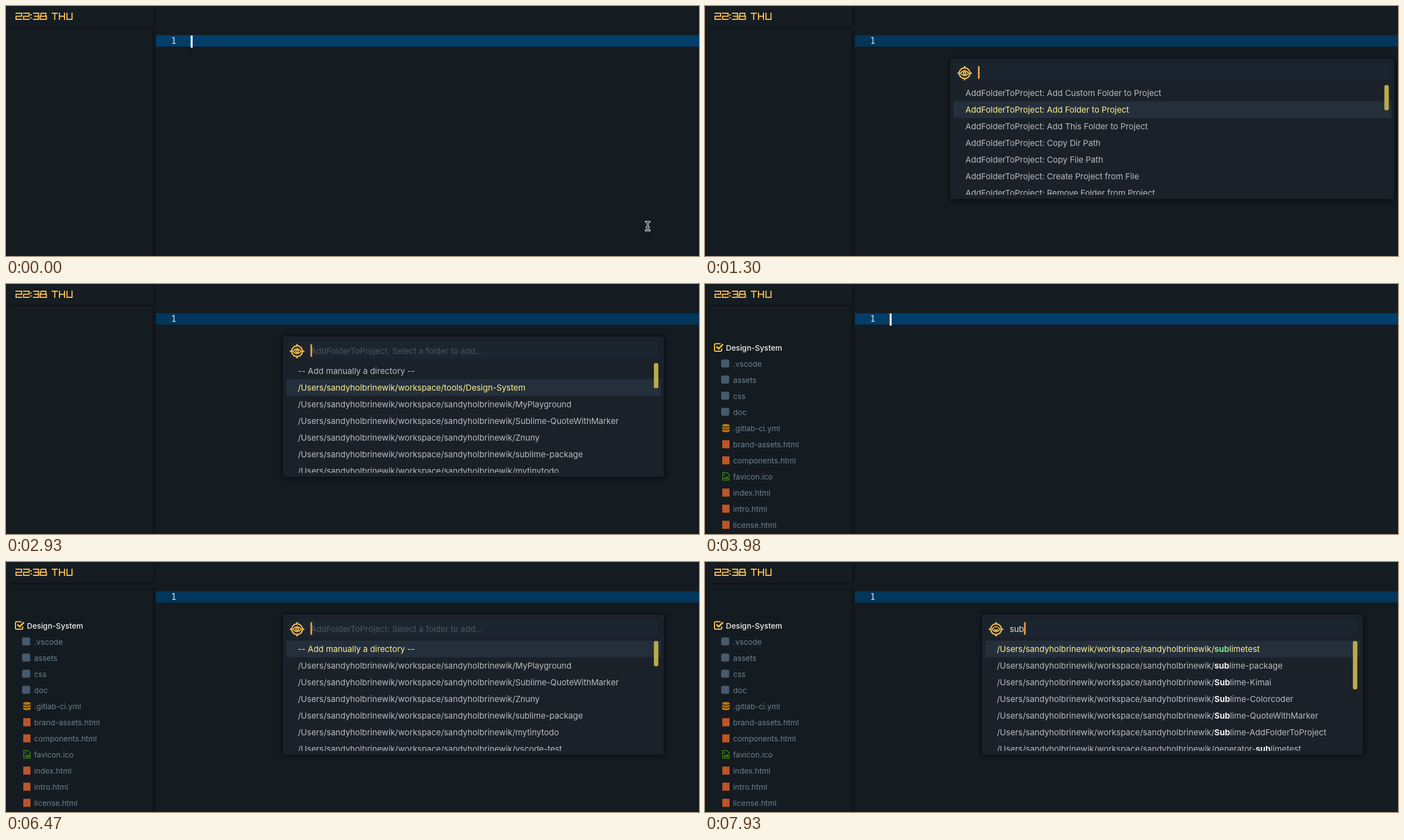
An HTML page that plays this animation: 1244 by 450 pixels, repeating every 8 s.

```html
<!DOCTYPE html>
<html lang="en">
<head>
<meta charset="utf-8">
<title>Add folder to project</title>
<style>
  html, body { margin: 0; width: 100%; height: 100%; overflow: hidden; background: #141b21; }
  svg { display: block; width: 100%; height: 100%; }
  text { font-family: Inter, Roboto, sans-serif; font-size: 14.8px; font-feature-settings: "calt" 0; white-space: pre; }
  .num { font-family: "DejaVu Sans Mono", monospace; font-size: 15px; fill: #dde4e6; }
  .side { font-size: 13.75px; fill: #6c818d; }
  .root { font-size: 13.75px; font-weight: 500; fill: #eff1ed; }
  .row { fill: #babdc0; }
  .row.on { fill: #fdf18f; }
  .hit { font-weight: 700; fill: #f0f2f3; }
  .on .hit { fill: #7de58a; }
  .hint { fill: #50545a; }
  .typed { fill: #eadfc0; }
  .line { fill: none; stroke-width: 2; }
</style>
</head>
<body>
<svg viewBox="0 0 1244 450" preserveAspectRatio="none">
  <defs>
    <filter id="soft" x="-10%" y="-10%" width="120%" height="120%"><feGaussianBlur stdDeviation="4"/></filter>
    <filter id="edge" filterUnits="userSpaceOnUse" x="-10" y="-10" width="300" height="480"><feGaussianBlur stdDeviation="1.2"/></filter>
    <clipPath id="list"><rect x="440" y="141" width="800" height="199"/></clipPath>
    <path id="beam" d="M1148.5 388.5Q1152 388.5 1152 391V401.5Q1152 404 1148.5 404M1155.5 388.5Q1152 388.5 1152 391M1152 401.5Q1152 404 1155.5 404M1150 398H1154"/>
  </defs>
  <rect width="1244" height="450" fill="#141b21"/>
  <path d="M8 37.5H265M265.5 0V37M265.5 46V450" fill="none" stroke="#0c1115" stroke-width="2.5" filter="url(#edge)"/>
  <rect width="264" height="36.5" fill="#151c22"/>
  <g id="clock" class="line" stroke="#fbc04c" role="img" aria-label="22:38 THU"></g>
  <g id="tree"></g>
  <rect id="current" x="269" y="52.5" width="975" height="20.5"/>
  <text class="num" x="296.5" y="67.5">1</text>
  <rect id="caret" x="331.5" y="53" width="3.5" height="22" fill="#f6f8f9"/>
  <g id="pointer" fill="none" stroke-linecap="round">
    <use href="#beam" stroke="#fff" stroke-width="3.3"/>
    <use href="#beam" stroke="#12181d" stroke-width="1.3"/>
  </g>
  <g id="panel"></g>
</svg>
<script>
const LOOP = 8000;
const $ = id => document.getElementById(id);
const home = '/Users/sandyholbrinewik/workspace/';
const own = home + 'sandyholbrinewik/';

const commands = ['Add Custom Folder to Project', 'Add Folder to Project', 'Add This Folder to Project',
  'Copy Dir Path', 'Copy File Path', 'Create Project from File', 'Remove Folder from Project']
  .map(name => 'AddFolderToProject: ' + name);
const manual = '-- Add manually a directory --';
const repos = ['MyPlayground', 'Sublime-QuoteWithMarker', 'Znuny', 'sublime-package', 'mytinytodo', 'vscode-test']
  .map(name => own + name);
const folders = [manual, home + 'tools/Design-System', ...repos.slice(0, 5)];
const remaining = [manual, ...repos];
const found = ['sublimetest', 'sublime-package', 'Sublime-Kimai', 'Sublime-Colorcoder',
  'Sublime-QuoteWithMarker', 'Sublime-AddFolderToProject', 'generator-sublimetest'].map(name => own + name);

const palette = { x: 441.5, w: 795, rows: commands };
const picker = { x: 498, w: 682, rows: folders, hint: 'AddFolderToProject: Select a folder to add...' };

// Each scene holds until the next one starts.
const scenes = [
  { at: 0 },
  { at: 330, ...palette, sel: 0, fade: [740, 815, 890] },
  { at: 1300, ...palette, sel: 1, fade: [1790, 1870, 1950] },
  { at: 2110, ...picker, sel: 0, fade: [2610, 2690] },
  { at: 2930, ...picker, sel: 1, fade: [3420, 3500] },
  { at: 3980 },
  { at: 5230, ...palette, sel: 1, fade: [5640, 5720] },
  { at: 6470, ...picker, rows: remaining, sel: 0, fade: [6880, 6960, 7040] },
  { at: 7450, ...picker, rows: found, sel: 0, typed: 's', thumb: 52 },
  { at: 7610, ...picker, rows: found, sel: 0, typed: 'su', thumb: 62 },
  { at: 7770, ...picker, rows: found, sel: 0, typed: 'sub', thumb: 87 }
];
const blinks = [[1790, 1950], [3660, 3740], [7930, LOOP]];

function rect(x, y, w, h, fill, extra = '') {
  return `<rect x="${x}" y="${y}" width="${w}" height="${h}" fill="${fill}" ${extra}/>`;
}

function label(x, y, cls, text) {
  return `<text x="${x}" y="${y}" class="${cls}">${text}</text>`;
}

function drawClock() {
  const glyphs = {
    2: 'M0 0H11V5.5H1V11H12',
    3: 'M0 0H10V11H0M2 5.5H10',
    8: 'M1 0H10V5.5H0V11H11V5.5H10M1 0V5.5',
    ':': 'M0 3H3M0 8.5H3',
    T: 'M0 0H11M5.5 0V12',
    H: 'M1 -1V12M1 5.5H10M10 -1V12',
    U: 'M1 -1V11H10V-1'
  };
  const places = [17, 30.5, 43.5, 48.5, 61.5, 82, 95, 108.5];
  $('clock').innerHTML = [...'22:38THU'].map((c, i) =>
    `<path transform="translate(${places[i]} 13)" d="${glyphs[c]}"/>`).join('');
}

function fileIcon(name, y) {
  if (!name.includes('.') || name === '.vscode') return rect(29, y - 8, 14.5, 14.5, '#465a6e', 'rx="3"');
  if (name.endsWith('.html')) return rect(31, y - 7.5, 13, 14.5, '#bd5528');
  if (name.endsWith('.ico')) {
    return `<g transform="translate(31 ${y - 8})" fill="none" stroke="#3b880e" stroke-width="1.5">
      <path d="M.8 .8H8.5L12.3 4.5V14.2H.8Z"/><path d="M2.5 12L5 8.5L6.5 10L9 6.8L11 12Z" fill="#3b880e" stroke="none"/>
      <circle cx="4" cy="5" r="1.2" fill="#3b880e" stroke="none"/></g>`;
  }
  return `<g transform="translate(30.8 ${y - 7.8})">
    <path d="M0 2.5C0 -.8 13.5 -.8 13.5 2.5V12.5C13.5 15.8 0 15.8 0 12.5Z" fill="#ba760b"/>
    <path d="M0 4.2Q6.75 7.6 13.5 4.2M0 8.7Q6.75 12.1 13.5 8.7" fill="none" stroke="#141b21" stroke-width="1.3"/></g>`;
}

function drawTree() {
  const files = ['.vscode', 'assets', 'css', 'doc', '.gitlab-ci.yml', 'brand-assets.html', 'components.html',
    'favicon.ico', 'index.html', 'intro.html', 'license.html'];
  $('tree').innerHTML =
    `<g class="line" stroke="#fbc04c"><path d="M28 107.5H19Q17 107.5 17 109.5V119Q17 121 19 121H28Q30 121 30 119V116"/>
     <path d="M20.5 112.5L24.5 116.5L32.3 108.5" stroke-width="2.8"/></g>` +
    label(37.5, 119.5, 'root', 'Design-System') +
    files.map((name, i) => {
      const y = 143.7 + i * 29;
      return fileIcon(name, y) + label(50.5, y + 5, 'side', name);
    }).join('');
}

function eyeIcon(x) {
  return `<g transform="translate(${x} 121)" class="line" stroke="#f9bd4a">
    <circle r="9.6" stroke-width="2.3"/>
    <path d="M0 -13V-8.5M0 13V8.5M-13 0H-8.5M13 0H8.5" stroke-width="2.4"/>
    <path d="M-7.2 0Q0 -9 7.2 0Q0 9 -7.2 0Z" fill="#1b2530"/>
    <circle r="2.3"/>
    <path id="lid" d="M-4 -1.2Q0 .4 4 -1.2L3.5 -3.5H-3.5Z" fill="#1b2530" stroke="none"/></g>`;
}

function rowText(s, row) {
  if (!s.typed) return row;
  const from = row.toLowerCase().indexOf('sublime', own.length);
  const to = from + s.typed.length;
  return `${row.slice(0, from)}<tspan class="hit">${row.slice(from, to)}</tspan>${row.slice(to)}`;
}

function drawPanel(s) {
  const { x, w } = s;
  const rows = s.rows.map((row, i) =>
    label(x + 26, 162 + i * 30, i === s.sel ? 'row on' : 'row', rowText(s, row))).join('');
  $('panel').innerHTML =
    rect(x - 1, 95, w + 2, 253, '#0a0e12', 'opacity=".75" filter="url(#soft)"') +
    rect(x + .5, 95.5, w - 1, 250, '#1a2129', 'rx="2" stroke="#202830"') +
    rect(x + 10, 104, w - 20, 30.5, '#1b2530', 'rx="2"') +
    eyeIcon(x + 24.5) +
    (s.typed ? label(x + 49, 126.3, 'typed', s.typed) : s.hint ? label(x + 49, 126.3, 'hint', s.hint) : '') +
    rect(x + 48.5, 108.5, 3, 22.5, '#f0a044', 'id="cursor"') +
    rect(x + 4.5, 141.5 + s.sel * 30, w - 9, 30, '#252f3c') +
    `<g clip-path="url(#list)">${rows}</g>` +
    rect(x + w - 17, 142.3, 8, s.thumb || 45.5, '#b7ab49', 'id="thumb" rx="3"');
  if (s.typed) {
    const end = $('panel').querySelector('.typed').getComputedTextLength();
    $('cursor').setAttribute('x', x + 49 + end);
  }
}

let shown;
function update(t) {
  const s = scenes.findLast(scene => scene.at <= t);
  if (s !== shown) {
    shown = s;
    const open = !!s.rows;
    $('current').setAttribute('fill', open ? '#02365b' : '#023e6a');
    $('caret').style.display = open ? 'none' : '';
    $('pointer').style.display = t < 1300 ? '' : 'none';
    $('tree').style.display = t < 3980 ? 'none' : '';
    if (open) drawPanel(s);
    else $('panel').innerHTML = '';
  }
  if (!s.rows) return;
  const fade = s.fade || [];
  const done = fade.filter(at => at <= t).length;
  $('thumb').setAttribute('opacity', fade.length ? 1 - done / fade.length : 1);
  $('lid').style.display = blinks.some(([a, b]) => t >= a && t < b) ? '' : 'none';
}

drawClock();
drawTree();
const start = performance.now();
function tick() {
  update((performance.now() - start) % LOOP);
  requestAnimationFrame(tick);
}
tick();
</script>
</body>
</html>
```
